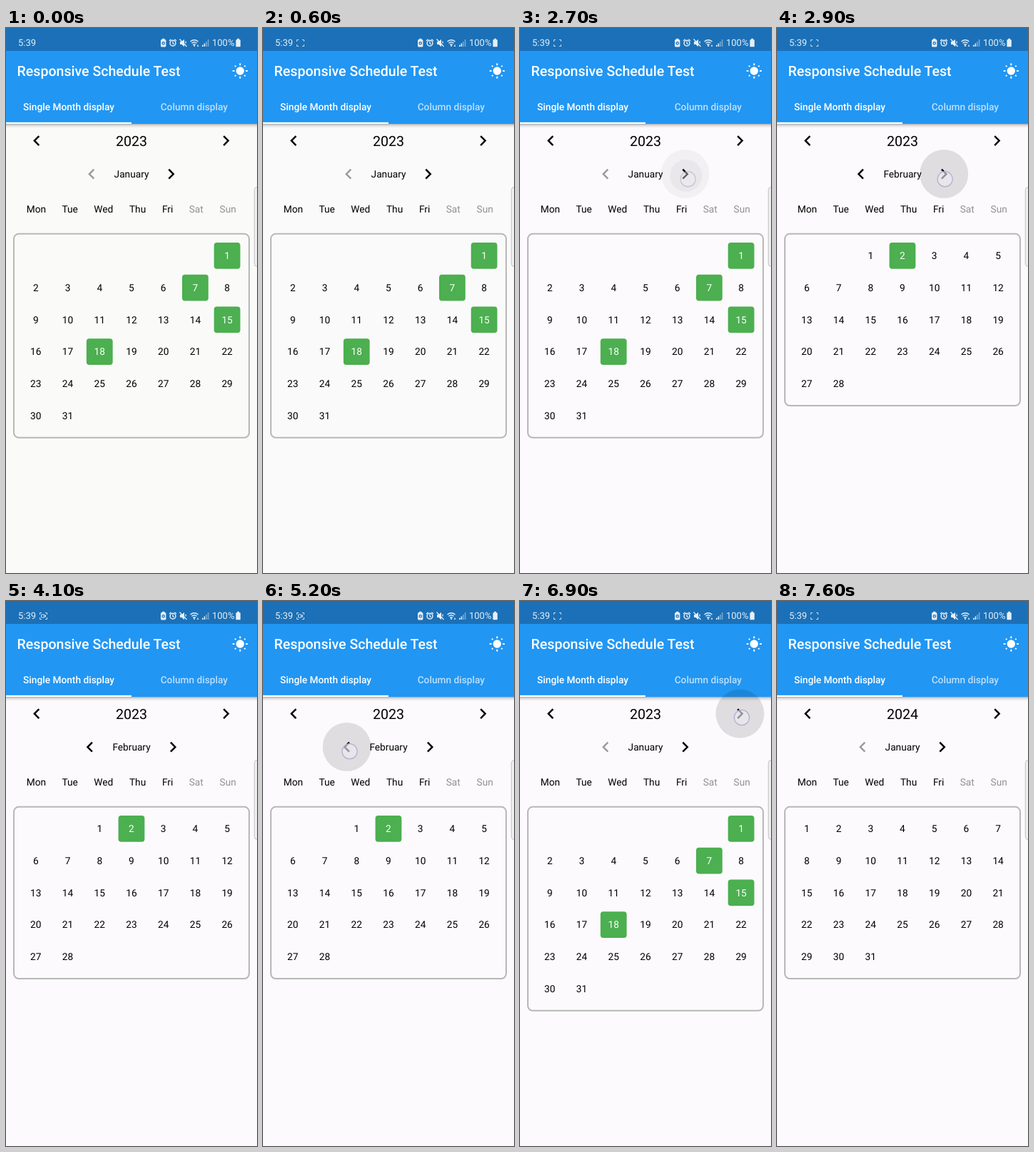
Animation, 352 px wide and 762 px high, one loop 8 s. Source, as an HTML page:

```html
<!DOCTYPE html>
<html lang="en">
<head>
<meta charset="utf-8">
<title>Calendar</title>
<style>
  html, body { margin: 0; width: 100%; height: 100%; overflow: hidden; background: #fcfafc; }
  svg { display: block; width: 352px; height: 762px; }
  text { font: 400 13.7px Roboto, sans-serif; text-anchor: middle; text-rendering: geometricPrecision; }
  .left { text-anchor: start; }
  .tab { font-weight: 500; fill: #fff; }
  .title { font-weight: 500; font-size: 19.56px; fill: #fff; }
  .year { font-size: 19.56px; }
  .status { font-size: 13px; fill: #e6eff8; }
</style>
</head>
<body>
<svg viewBox="0 0 352 762" xmlns="http://www.w3.org/2000/svg">
  <defs>
    <linearGradient id="shade" x2="0" y2="1">
      <stop stop-color="#000" stop-opacity=".3"/>
      <stop offset=".45" stop-color="#000" stop-opacity=".1"/>
      <stop offset="1" stop-color="#000" stop-opacity="0"/>
    </linearGradient>
    <path id="prev" d="M3.41-4.59 2-6-4 0 2 6 3.41 4.59-1.17 0z" transform="scale(1.2225)"/>
    <path id="next" d="M-3.41-4.59-2-6 4 0-2 6-3.41 4.59 1.17 0z" transform="scale(1.2225)"/>
  </defs>

  <rect id="page" width="352" height="762"/>
  <rect y="134" width="352" height="6" fill="url(#shade)"/>
  <rect width="352" height="134" fill="#2196f3"/>
  <rect width="352" height="32" fill="#1b70b7"/>
  <rect y="131.8" width="176" height="2.2" fill="#fff"/>

  <!-- status bar -->
  <text class="status left" x="17" y="25.2">5:39</text>
  <g id="record" fill="none" stroke="#c9dced">
    <path d="M47.5 19v-2.5h2.5M55 16.5h2.5V19M57.5 23v2.5H55M50 25.5h-2.5V23"/>
    <path id="camera" d="M49.5 19h4v4h-4zM53.5 20.5l2-1v3l-2-1"/>
  </g>
  <g fill="#e6eff8">
    <rect x="217" y="16" width="7.4" height="10.4" rx="1.5"/>
    <rect x="219" y="14.8" width="3.4" height="2"/>
    <circle cx="220.7" cy="21.3" r="1.7" fill="none" stroke="#1b70b7" stroke-width="1.2"/>
    <circle cx="234" cy="21.2" r="3.9" fill="none" stroke="#e6eff8" stroke-width="1.5"/>
    <path d="M234 18.6v3l1.8 1M229 18l2.6-2.3M239 18l-2.6-2.3" fill="none" stroke="#e6eff8" stroke-width="1.3"/>
    <path d="M244 19h2.4l3.6-3.2v10.4l-3.6-3.2H244z"/>
    <path d="M243.5 15.5l10 10.5M252 18.5v3" fill="none" stroke="#e6eff8" stroke-width="1.3"/>
    <g fill="none" stroke="#e6eff8" stroke-width="1.4">
      <path d="M258.5 19q5.5-4.6 11 0M260.4 21.3q3.6-3 7.2 0M262.2 23.4q1.8-1.4 3.6 0"/>
    </g>
    <circle cx="264" cy="25" r="1.1"/>
    <path d="M269 23l1.3 2.8h-2.6z"/>
    <path d="M275 26v-2.2h1.6V26zM277.6 26v-4.4h1.6V26z"/>
    <path d="M280.2 26v-7h1.6v7zM282.8 26V16h1.6v10z" opacity=".45"/>
    <path d="M322.4 17q0-.8.8-.8h1v-1.4h2.8v1.4h1q.8 0 .8.8v8.4q0 .9-.9.9h-4.6q-.9 0-.9-.9z"/>
  </g>
  <text class="status left" x="289" y="25.2">100%</text>

  <!-- app bar -->
  <text class="title left" x="15.6" y="67.2">Responsive Schedule Test</text>
  <g id="sun" transform="translate(328.3 60)" fill="#fff" stroke="#fff" stroke-width="2"><circle r="4.7"/></g>
  <text class="tab" x="88" y="114.6">Single Month display</text>
  <text class="tab" x="263.8" y="114.6" opacity=".7">Column display</text>

  <!-- calendar -->
  <g id="ripple"><circle id="glow" r="34" opacity=".06"/><circle id="splash" opacity=".06"/></g>
  <use href="#prev" x="43" y="157.6"/>
  <use href="#next" x="308.5" y="157.6"/>
  <text id="year" class="year" x="176" y="165"/>
  <use id="back" href="#prev" y="204.2"/>
  <use id="forth" href="#next" y="204.2"/>
  <text id="month" x="176" y="209"/>
  <g id="week"></g>
  <rect id="frame" x="11" y="287.8" width="330" rx="7" fill="none" stroke="#b7b8b7" stroke-width="2"/>
  <g id="days"></g>

  <rect x="348.3" y="222.5" width="12" height="111" rx="4" fill="#f1f0f1" stroke="#c2c1c2"/>
  <circle id="finger" r="10.6" fill="#ececf2" fill-opacity=".62" stroke="#b4b0cf" stroke-width="1.2"/>
</svg>
<script>
const LOOP = 8000, STEP = 100, PITCH = 44.72;
const $ = id => document.getElementById(id);

function add(parent, tag, attrs, label) {
  const el = document.createElementNS('http://www.w3.org/2000/svg', tag);
  for (const key in attrs) el.setAttribute(key, attrs[key]);
  if (label !== undefined) el.textContent = label;
  parent.append(el);
}
function set(id, attrs) {
  for (const key in attrs) $(id).setAttribute(key, attrs[key]);
}

// offset: weekday of the first day, counted from Monday
const january = { month: 'January', year: 2023, offset: 6, count: 31, marked: [1, 7, 15, 18], back: 120, forth: 231.6 };
const february = { month: 'February', year: 2023, offset: 2, count: 28, marked: [2], back: 117.6, forth: 234.2 };
const nextYear = { ...january, year: 2024, offset: 0, marked: [] };

const taps = [
  { start: 2600, swap: 2900, end: 3100, view: february, button: v => [v.forth, 204], finger: [235.6, 211.3] },
  { start: 4900, swap: 5300, end: 5400, view: january, button: () => [117.6, 204], finger: [121.5, 210.3] },
  { start: 6600, swap: 7000, end: 7200, view: nextYear, button: () => [308.5, 157.6], finger: [311, 163] }
];

for (let i = 0; i < 8; i++) {
  add($('sun'), 'path', { d: i % 2 ? 'M0-8.4v-2' : 'M0-7.8v-2.8', transform: `rotate(${i * 45})` });
}
const weekX = [42.4, 89.6, 136.7, 184.6, 226.6, 266.7, 311.2];
['Mon', 'Tue', 'Wed', 'Thu', 'Fri', 'Sat', 'Sun'].forEach((name, i) =>
  add($('week'), 'text', { x: weekX[i], y: 258, fill: i > 4 ? '#929192' : '#000' }, name));

let shown;
function showView(view) {
  if (view === shown) return;
  shown = view;
  $('year').textContent = view.year;
  $('month').textContent = view.month;
  set('back', { x: view.back, fill: view.month === 'January' ? '#9c9b9c' : '#000' });
  set('forth', { x: view.forth });
  const rows = Math.ceil((view.offset + view.count) / 7);
  set('frame', { height: 16.7 + rows * PITCH });
  const days = $('days');
  days.replaceChildren();
  for (let day = 1; day <= view.count; day++) {
    const cell = view.offset + day - 1;
    const x = 41.8 + cell % 7 * PITCH;
    const y = 318.4 + Math.floor(cell / 7) * PITCH;
    const on = view.marked.includes(day);
    if (on) add(days, 'rect', { x: x - 18.4, y: y - 18.4, width: 36.8, height: 36.8, rx: 4, fill: '#4caf50' });
    add(days, 'text', { x, y: y + 4.9, fill: on ? '#fff' : '#000' }, day);
  }
}

function showTap(tap, t) {
  const grow = tap ? Math.min(1, (t - tap.start + STEP) / 300) : 0;
  const opacity = tap ? Math.min(grow, (tap.end - t) / 200) : 0;
  set('ripple', { opacity });
  set('finger', { opacity });
  if (!tap) return;
  const [x, y] = tap.button(shown);
  const [fx, fy] = tap.finger;
  set('glow', { cx: x, cy: y });
  set('splash', { cx: fx + (x - fx) * grow, cy: fy + (y - fy) * grow, r: 34 * grow });
  set('finger', { cx: fx, cy: fy });
}

function draw(now) {
  const t = Math.floor(now % LOOP / STEP) * STEP;
  const tint = Math.min(1, t / 900);
  set('page', { fill: `rgb(${250 + 2 * tint},250,${248 + 4 * tint})` });
  set('record', { opacity: t < 100 ? 0 : 1 });
  set('camera', { opacity: (t + 900) % 1000 < 500 ? 1 : 0 });
  showView(taps.reduce((view, tap) => t >= tap.swap ? tap.view : view, january));
  showTap(taps.find(tap => t >= tap.start && t < tap.end), t);
}

let origin;
function tick(now) {
  origin ??= now;
  draw(now - origin);
  requestAnimationFrame(tick);
}
draw(0);
requestAnimationFrame(tick);
</script>
</body>
</html>
```
